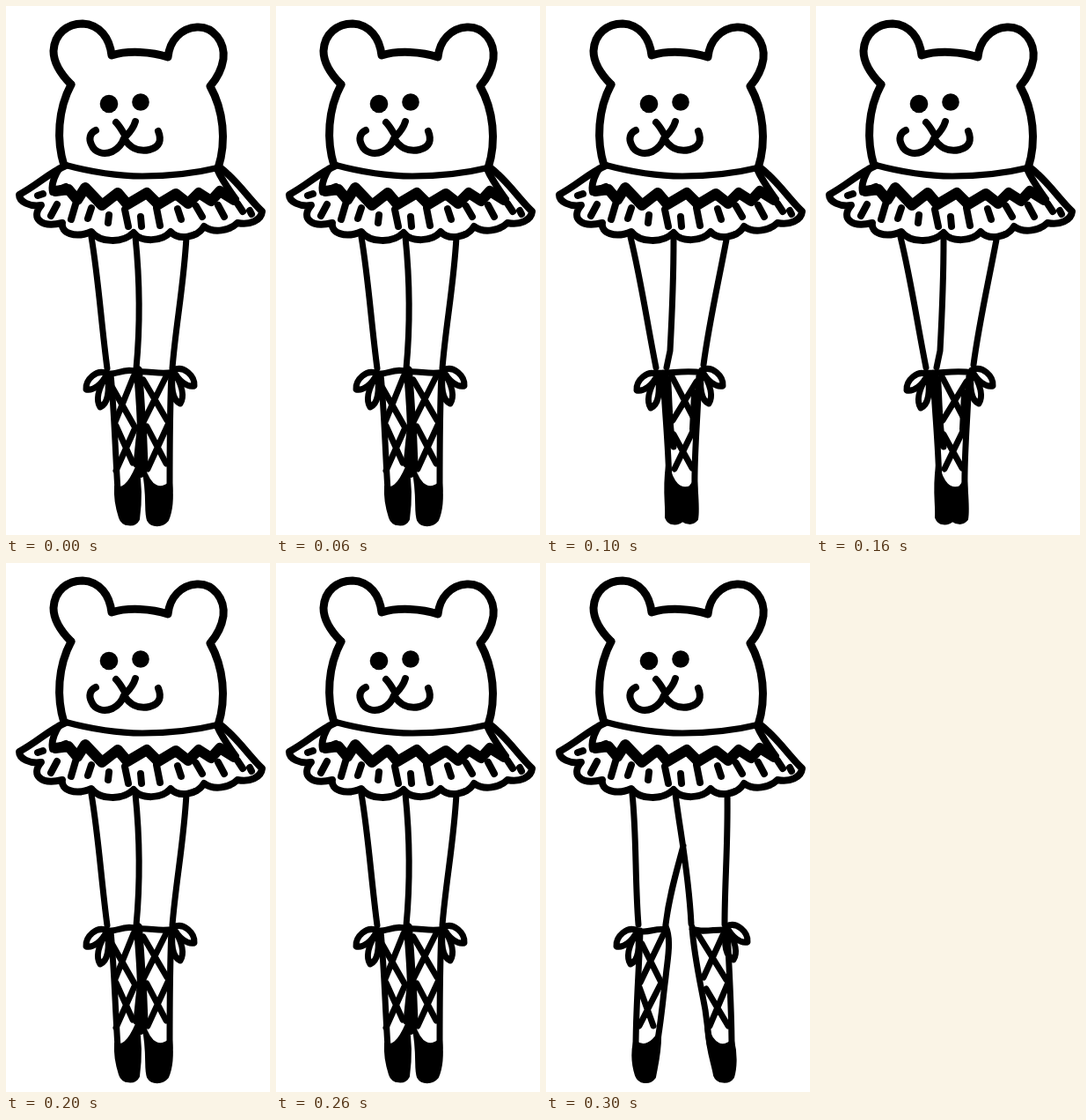
These frames come from a looping animation (300 px wide and 600 px high, 400 ms). An HTML page:

```html
<!DOCTYPE html>
<html lang="en">
<head>
<meta charset="utf-8">
<title>Dancing bear</title>
<style>
html, body { margin: 0; width: 100%; height: 100%; overflow: hidden; background: #fff; }
svg { display: block; width: 100vw; height: 100vh; }
path { fill: none; stroke: #000; stroke-width: 7; stroke-linecap: round; stroke-linejoin: round; }
.head { stroke-width: 9; }
.frill { stroke-width: 8; }
.zigzag { stroke-width: 12; }
.thick { stroke-width: 10; }
.solid { fill: #000; stroke-width: 4; }
</style>
</head>
<body>
<svg viewBox="0 0 300 600">
  <g id="legs"></g>
  <g id="bear">
    <path class="head" d="M74 89C62 77 54 64 54 51C55 31 70 20 87 20C107 21 118 37 120 56C139 50 166 52 184 58C186 39 199 25 217 24C236 23 249 41 247 60C245 73 239 83 232 91C247 118 251 153 241 184"/>
    <path class="head" d="M74 89C59 117 57 152 66 181"/>
    <path d="M66 180C92 187 120 193 155 193C190 193 218 189 243 183"/>
    <path class="frill" d="M102 141C95 144 94 151 97 157C101 167 112 169 121 165C129 161 132 156 134 150C140 160 150 166 163 163C175 160 177 152 173 142M125 132C130 137 132 142 136 148C141 143 145 138 147 131"/>
    <circle cx="117" cy="111" r="10.3"/>
    <circle cx="153" cy="109" r="9.8"/>
    <path class="frill" d="M68 181C49 189 36 203 15 214C15 222 27 228 40 226C28 240 39 252 64 246C62 257 78 264 97 256C106 268 132 270 145 257C153 268 177 268 187 256C196 266 217 263 225 250C236 258 254 255 263 246C277 249 290 243 291 233C276 219 263 198 243 183"/>
    <path class="frill" d="M60 185C55 193 51 202 53 211L68 205M240 185C245 197 253 208 261 219"/>
    <path class="zigzag" d="M56 210L71 208L81 220L90 206L109 226L127 212L138 225L160 212L173 225L193 213L207 224L219 212L233 221L243 210L259 220"/>
    <path class="frill" d="M36 215L42 213M58 225L51 238M79 225L74 242M97 229L93 241M117 237L116 246M135 231L139 250M153 239L154 250M171 229L175 249M195 230L199 242M216 227L223 239M241 226L248 239M263 224L269 233M277 232L279 236"/>
  </g>
</svg>
<script>
const STEP = 100;
const line = (d, kind = "") => `<path class="${kind}" d="${d}"/>`;

// Two loops hanging from a knot; side -1 mirrors them.
const bow = (x, y, side) => {
  const p = (dx, dy) => `${x + dx * side} ${y + dy}`;
  return line(`M${p(0, 0)}C${p(-12, -6)} ${p(-25, 7)} ${p(-24, 18)}C${p(-16, 20)} ${p(-6, 12)} ${p(0, 0)}` +
    `C${p(-9, 15)} ${p(-14, 29)} ${p(-8, 38)}C${p(1, 34)} ${p(3, 19)} ${p(0, 0)}`);
};

const together = [
  line("M97 262C105 309 108 358 115 411M147 262C152 311 153 358 148 411M205 262C202 317 193 361 189 411"),
  line("M116 417C126 418 137 410 148 415C162 413 176 419 190 415M119 418C123 458 124 504 127 549M188 416C186 460 186 502 186 550"),
  line("M121 433L146 477M145 420L124 472M125 476L144 518M147 478L125 527M156 424L183 470M182 420L157 470M160 477L182 519M184 475L161 525"),
  line("M150 413C152 443 156 478 153 530", "thick"),
  line("M154 462L148 520M156 470L158 520"),
  line("M125 545C131 551 140 544 149 523C153 543 153 560 150 582C146 590 133 589 130 580C127 571 124 560 125 545ZM156 523C164 549 176 550 187 541C189 559 187 574 183 583C177 590 166 590 162 583C158 572 163 558 156 523Z", "solid"),
  bow(115, 417, 1), bow(190, 413, -1)
];

const crossed = [
  line("M96 262C108 311 115 360 125 410M145 264C145 312 143 354 141 391L137 410M205 265C195 318 185 361 179 407"),
  line("M126 416C140 418 156 412 178 416M133 416C135 463 140 506 140 550M174 416C173 461 168 508 169 548M138 416C141 447 139 475 145 500"),
  line("M143 420L168 468M171 426L144 470M145 486L166 524M168 480L146 525"),
  line("M136 424L140 482M170 440L168 480", "thick"),
  line("M138 521C143 540 151 551 164 546L170 538C171 555 173 571 171 582C166 588 159 586 155 583C149 588 140 588 137 580C138 565 134 550 138 521Z", "solid"),
  bow(127, 418, 1), bow(177, 413, -1)
];

const apart = [
  line("M98 262C103 309 101 360 105 410M147 262C153 309 162 350 165 409M156 321C148 351 140 377 136 410M206 262C207 317 203 362 203 410"),
  line("M105 417C115 421 125 413 136 416M166 415C178 420 192 415 205 416M107 417C106 459 102 505 102 550M136 412C143 428 138 449 136 470C133 492 131 520 126 546M166 413C168 445 176 479 181 507L186 545M206 415C208 460 211 505 211 550"),
  line("M109 432L130 474M133 422L107 476M106 481L122 525M130 478L106 525M172 420L205 473M201 422L179 470M182 483L207 525M207 476L186 525"),
  line("M101 543C111 552 121 545 129 533C130 553 125 571 123 583C117 591 106 589 103 581C99 569 98 557 101 543ZM182 526C190 550 202 551 212 542C216 557 215 574 212 583C207 590 195 589 192 581C190 568 184 555 182 526Z", "solid"),
  bow(104, 417, 1), bow(205, 412, -1)
];

const poses = [together, crossed, together, apart].map(p => p.join(""));
const legs = document.getElementById("legs");
let shown = -1;

function draw(time) {
  const i = Math.floor(time / STEP) % poses.length;
  if (i !== shown) legs.innerHTML = poses[shown = i];
}

const start = performance.now();
function tick() {
  draw(performance.now() - start);
  requestAnimationFrame(tick);
}
tick();
</script>
</body>
</html>
```
